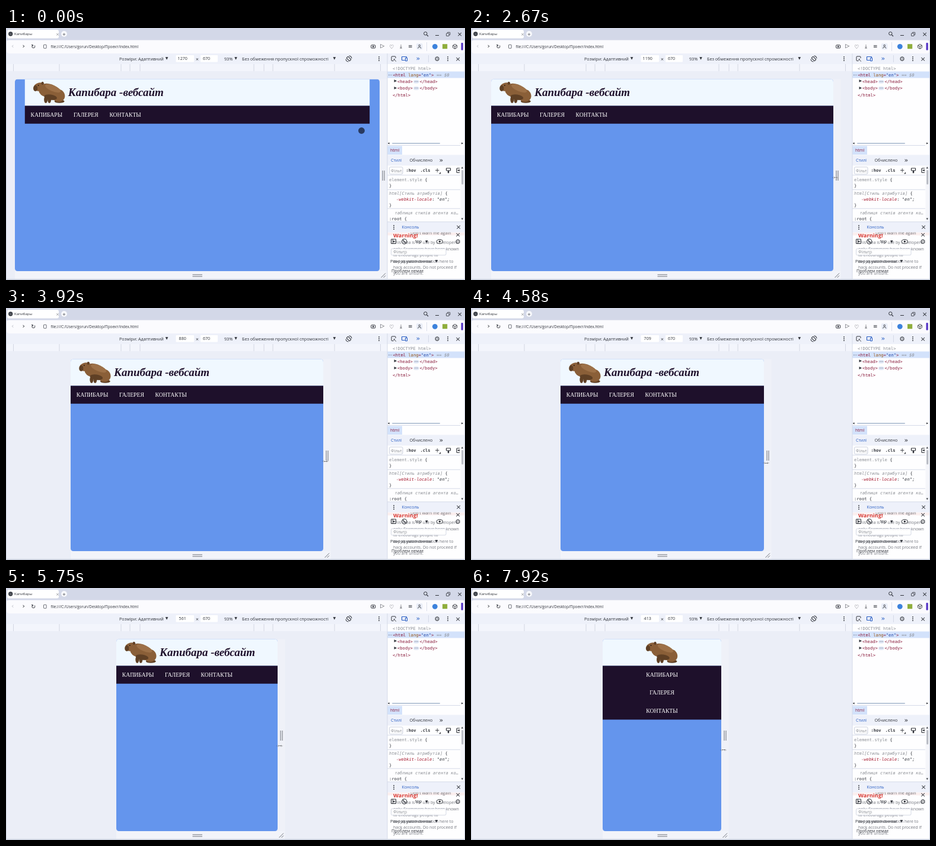
Write an HTML page with a canvas that moves like this. It is 774 by 426 pixels and loops after 8 s.

```html
<!DOCTYPE html>
<html lang="uk">
<head>
<meta charset="utf-8">
<title>Капибары</title>
<style>
html, body { margin: 0; width: 100%; height: 100%; overflow: hidden; background: #ebeef7; }
canvas { display: block; width: 774px; height: 426px; }
</style>
</head>
<body>
<canvas id="stage"></canvas>
<script>
const W = 774, H = 426, LOOP = 8000, FPS = 12;
const canvas = document.getElementById('stage');
const ratio = window.devicePixelRatio || 1;
canvas.width = W * ratio;
canvas.height = H * ratio;
const c = canvas.getContext('2d');

const UI = '"Open Sans", "Noto Sans", sans-serif';
const MONO = '"DejaVu Sans Mono", monospace';
const SERIF = '"Liberation Serif", "Noto Serif", serif';
const SIGN = '"DejaVu Sans", sans-serif';
const INK = '#30333a', GRAY = '#8b8e94', BLUE = '#2a5fc4', TAG = '#8a1c3c';
const BAR = '#eef1fa', RULE = '#d5dae8', MARK = '#d3e2fb';

// ---- drawing helpers ----
function rect(x, y, w, h, fill, r = 0) {
  c.fillStyle = fill;
  c.beginPath();
  c.roundRect(x, y, w, h, r);
  c.fill();
}
function frame(x, y, w, h, color = INK, r = 1, lw = 1) {
  c.strokeStyle = color;
  c.lineWidth = lw;
  c.beginPath();
  c.roundRect(x, y, w, h, r);
  c.stroke();
}
function oval(x, y, rx, ry, fill, turn = 0) {
  c.fillStyle = fill;
  c.beginPath();
  c.ellipse(x, y, rx, ry, turn, 0, 7);
  c.fill();
}
const dot = (x, y, r, fill) => oval(x, y, r, r, fill);
function ring(x, y, r, color = INK, lw = 1, from = 0, to = 6.3) {
  c.strokeStyle = color;
  c.lineWidth = lw;
  c.beginPath();
  c.arc(x, y, r, from, to);
  c.stroke();
}
function line(x1, y1, x2, y2, color = INK, lw = 1) {
  c.strokeStyle = color;
  c.lineWidth = lw;
  c.beginPath();
  c.moveTo(x1, y1);
  c.lineTo(x2, y2);
  c.stroke();
}
function clipTo(x, y, w, h, r, paint) {
  c.save();
  c.beginPath();
  c.roundRect(x, y, w, h, r);
  c.clip();
  paint();
  c.restore();
}
// y is the middle of the capitals
function text(s, x, y, size, color = INK, font = UI, style = '', align = 'left') {
  c.font = `${style} ${size}px ${font}`;
  c.fillStyle = color;
  c.textAlign = align;
  c.fillText(s, x, y + size * 0.35);
  return c.measureText(s).width;
}
// a symbol with its ink centred on x, y
function icon(s, x, y, size = 9, color = INK) {
  c.font = `${size}px ${SIGN}`;
  c.fillStyle = color;
  c.textAlign = 'left';
  const m = c.measureText(s);
  c.fillText(s, x + (m.actualBoundingBoxLeft - m.actualBoundingBoxRight) / 2,
    y + (m.actualBoundingBoxAscent - m.actualBoundingBoxDescent) / 2);
}
function code(x, y, ...parts) {
  for (const [s, color, style] of parts) x += text(s, x, y, 7.15, color, MONO, style);
}
const caret = (x, y) => icon('▼', x, y, 6);
const cross = (x, y) => icon('×', x, y, 11);
const kebab = (x, y) => [-3, 0, 3].forEach(d => dot(x, y + d, 0.9, INK));

// ---- motion ----
const SCALE = 0.4845, MID = 322.3, TOP = 86.5, BOTTOM = 411, GRAB = 24, END = 95;
const WIDTH = [[GRAB, 1268], [38, 1086], [55, 709], [69, 561], [83, 456], [93, 413]];

// monotone cubic through [tick, value] points
function track(keys, k) {
  const n = keys.length - 1;
  if (k <= keys[0][0]) return keys[0][1];
  if (k >= keys[n][0]) return keys[n][1];
  const rate = i => (keys[i + 1][1] - keys[i][1]) / (keys[i + 1][0] - keys[i][0]);
  const slope = i => {
    if (i === 0 || i === n) return 0;
    const a = rate(i - 1), b = rate(i);
    return a * b <= 0 ? 0 : 2 * a * b / (a + b);
  };
  let i = 0;
  while (k > keys[i + 1][0]) i++;
  const d = keys[i + 1][0] - keys[i][0], u = (k - keys[i][0]) / d;
  const e = u * u * (3 - 2 * u);
  return keys[i][1] * (1 - e) + keys[i + 1][1] * e
    + d * u * (1 - u) * (slope(i) * (1 - u) - slope(i + 1) * u);
}
function pointerAt(k, right) {
  if (k < GRAB) {
    const u = Math.min(1, k / 11), e = u * u * (3 - 2 * u);
    return [599.5 + 31.8 * e, 173.5 + 71.5 * e];
  }
  const reach = 4 - 2.2 * Math.max(0, 1 - (k - GRAB) / 8);
  return [right + reach, 245 + 28.5 * ((k - GRAB) / (END - GRAB)) ** 0.6];
}

// ---- browser window ----
function browser() {
  rect(0, 0, W, 21, '#d3d8e8');
  rect(2, 3, 87, 14.5, '#fff', 3);
  dot(7.7, 10, 3.7, '#3c4047');
  icon('~', 7.7, 10, 6, '#cfd3da');
  text('Капибары', 14, 10, 6.1);
  icon('×', 86.5, 10, 7, GRAY);
  dot(98, 10, 5, '#f7f8fc');
  icon('+', 98, 10, 7);
  ring(707.3, 9.3, 2.7);
  line(709.3, 11.3, 712, 14, INK, 1.2);
  line(724, 12.5, 730, 12.5);
  frame(744.3, 7.3, 4.5, 4.5, INK, 0.5, 0.8);
  rect(742, 8.7, 5.2, 5.2, '#d3d8e8');
  frame(742.5, 9, 4.5, 4.5, INK, 0.5, 0.8);
  cross(765, 10);

  rect(1, 20.5, W - 2, 22.5, '#fbfbfe', 4);
  icon('‹', 11, 31.3, 11, '#c0c4cd');
  icon('›', 30, 31.3, 11);
  icon('↻', 46, 31.3, 10);
  frame(63.5, 28.3, 4.6, 6, '#5c6068', 0.7, 0.9);
  text('file:///C:/Users/gorun/Desktop/Проект/index.html', 75.5, 31.5, 6.35);

  frame(615.7, 28.8, 7, 5.2);
  dot(619.2, 31.4, 1.3, INK);
  ['▷', '♡', '⤓', '≡'].forEach((s, i) => icon(s, 634.7 + 15.6 * i, 31.3, 9));
  rect(692, 26, 10.5, 10.5, '#e9edf7', 2);
  ring(697.2, 29.7, 1.4, INK, 0.8);
  ring(697.2, 34.6, 2.6, INK, 0.8, Math.PI, 2 * Math.PI);
  line(709.5, 24, 709.5, 39, '#dadfec');
  dot(723.3, 31.3, 4.4, '#3c82dc');
  rect(736, 27.2, 8.2, 8, '#8fae3c');
  for (let i = 0; i < 6; i++) {
    const at = n => [757 + 3.9 * Math.sin(n * Math.PI / 3), 31.3 + 3.9 * Math.cos(n * Math.PI / 3)];
    line(...at(i), ...at(i + 1), INK, 0.9);
    if (i % 2 === 0) line(757, 31.3, ...at(i), INK, 0.9);
  }
  rect(767.5, 25, 3.2, 12.5, '#5232c4', 1);
}

function deviceBar(width) {
  rect(1, 43, 642, 18, BAR);
  text('Розміри: Адаптивний', 191, 52, 7.2);
  text('93%', 368, 52, 7.2);
  text('Без обмеження пропускної спроможності', 398, 52, 7.2);
  for (const x of [271.3, 387.7, 554]) caret(x, 51.7);
  rect(286.5, 46, 30.5, 11.5, '#fff', 1);
  rect(328, 46, 29, 11.5, '#fff', 1);
  text(width, 297.7, 52, 7.1, INK, UI, '', 'center');
  text('670', 338, 52, 7.1, INK, UI, '', 'center');
  icon('×', 322, 52.3, 7);
  c.save();
  c.translate(578, 52);
  c.rotate(-Math.PI / 4);
  frame(-1.9, -3.6, 3.8, 7.2, INK, 0.8, 1.1);
  for (const a of [0, Math.PI]) ring(0, 0, 5, INK, 1, a - 0.7, a + 0.7);
  c.restore();
  kebab(629, 52);

  rect(1, 61, 642, 12, '#f3f5fc');
  for (const d of [96, 113, 128, 232, 309.5])
    for (const s of [-1, 1]) line(322 + s * d, 61, 322 + s * d, 73, '#d3d7e2');
}

// ---- side panel ----
function panel() {
  rect(643, 43, 131, 383, '#fefeff');
  rect(643, 43, 131, 18, BAR);
  frame(650, 48, 7, 7.5);
  rect(653.5, 51, 5.5, 6, BAR);
  icon('↖', 656, 54, 8);
  frame(667.5, 48.5, 8, 6, BLUE, 0.7, 1.2);
  rect(672.8, 50, 4.4, 6.6, BAR);
  frame(673.5, 50.5, 3, 5.3, BLUE, 0.7, 1.1);
  icon('»', 695, 52, 11, BLUE);
  line(712.5, 46, 712.5, 58, RULE);
  icon('⚙', 727, 52, 11);
  kebab(745, 52);
  cross(762, 52);

  rect(643, 73.5, 131, 11, MARK);
  icon('…', 647.7, 79, 7);
  code(652, 68, ['<!DOCTYPE html>', GRAY]);
  code(652.5, 79, ['<html ', TAG], ['lang', '#9a5a1c'], ['=', TAG], ['"en"', '#2347a8'], ['>', TAG]);
  code(726, 79, ['== $0', GRAY, 'italic']);
  ['head', 'body'].forEach((name, i) => {
    const y = 90.5 + 11.2 * i;
    icon('▶', 657, y - 0.7, 6);
    code(660, y, [`<${name}>`, TAG]);
    rect(687.3, y - 2.6, 8.8, 5.6, '#dce4f4', 2.5);
    icon('…', 691.7, y + 0.2, 6.5);
    code(697.5, y, [`</${name}>`, TAG]);
  });
  code(652, 113, ['</html>', TAG]);

  rect(651, 194.2, 81, 1.6, '#a3b4cc', 1);
  icon('◀', 645.5, 195, 4);
  icon('▶', 770, 195, 4);
  rect(643, 199.5, 25, 14.5, MARK);
  text('html', 648, 207, 7.1, TAG);

  rect(643, 214.5, 131, 18, BAR);
  text('Стилі', 649, 223.5, 7.1, BLUE);
  text('Обчислено', 680.5, 223.5, 7.1);
  icon('»', 734, 223.5, 11);
  frame(646.5, 235, 22.5, 12, '#c3c9d8', 2, 0.8);
  clipTo(647, 235, 20.5, 12, 0, () => text('Фільтр', 649, 241.2, 6.9, GRAY));
  text(':hov', 674.5, 240.7, 7, INK, MONO, 'bold');
  text('.cls', 698.5, 240.7, 7, INK, MONO, 'bold');
  icon('+', 727.5, 240.7, 10);
  icon('◢', 732, 244.5, 4);
  frame(742.5, 237, 7, 4, INK, 0.5, 1.2);
  rect(744.8, 241, 2.4, 4.3, INK);
  clipTo(759, 235, 6, 12, 0, () => frame(760, 237, 9, 7.5, INK, 1, 1.2));
  icon('◀', 763, 240.7, 5);

  code(646, 256, ['element.style ', GRAY], ['{', INK]);
  code(646, 266.3, ['}', INK]);
  code(646, 279.5, ['html[Стиль атрибутів] ', GRAY, 'italic'], ['{', INK]);
  code(658, 289.8, ['-webkit-locale', '#a81c30', 'italic'], [': ', INK], ['"en";', INK, 'italic']);
  code(646, 299.3, ['}', INK]);
  code(655.5, 312.5, ['таблиця стилів агента ко…', GRAY, 'italic']);
  code(646, 322, [':root ', INK], ['{', INK]);
  for (const y of [198.5, 248.8, 273.2, 305.2]) line(643, y, 766, y, RULE);
  rect(766.5, 233, 7, 94, '#f5f6fa');
  icon('▲', 769.8, 235.5, 4);
  rect(768.2, 240, 3, 24.5, '#b9bcc4', 1.5);
  icon('▼', 769.8, 323.3, 4);

  rect(643, 328, 131, 17.5, BAR);
  line(643, 327.7, W, 327.7, RULE);
  kebab(654, 337);
  text('Консоль', 667.5, 337, 7.1, BLUE);
  cross(763, 336.7);
  clipTo(643, 345.5, 131, 79, 0, drawer);
  line(643, 43, 643, 424, RULE);
}

function drawer() {
  rect(643, 345.5, 131, 5, '#fbefef');
  text("Don't warn me again", 682, 346.8, 7.1, '#6a6d74');
  text('Warning!', 653, 350.8, 9.3, '#d83a34', UI, 'bold');
  ['This area is for use by developers', 'only. Scammers have been known', 'to encourage people to',
    'copy/paste information here to', 'hack accounts. Do not proceed if', 'you are unsure.'
  ].forEach((s, i) => text(s, 653, 363 + i * 10.4, 7, '#74777e'));
  cross(762, 349.7);
  frame(649.5, 357, 8, 7.5, INK, 0.7, 1.1);
  line(652.2, 357, 652.2, 364.5);
  icon('▶', 655, 360.8, 4);
  ring(671.7, 361, 4.2, INK, 1.1);
  line(668.8, 358, 674.6, 364, INK, 1.1);
  text('top', 690, 361, 7.1);
  caret(709.5, 361);
  oval(731.3, 361, 5.6, 3.9, INK);
  oval(731.3, 361, 4.6, 2.9, '#fff');
  dot(731.3, 361, 1.7, INK);
  icon('⚙', 762, 361, 11);
  rect(649.5, 373, 92.5, 11, 'rgba(255,255,255,0.88)', 2);
  frame(649.5, 373, 92.5, 11, '#c3c9d8', 2, 0.7);
  text('Фільтр', 653, 378.7, 7.1, GRAY);
  text('Рівні за умовчанням', 648, 394.7, 7);
  caret(726, 394);
  text('Проблем немає', 650, 410.5, 7.1);
}

// ---- page under test ----
function capybara(x, y) {
  const coat = '#8a5f38', shade = '#5f4025';
  c.save();
  c.translate(x, y);
  oval(44, 33, 8.5, 2.8, shade);
  for (const d of [0, 6]) oval(21 + d, 30, 3, 6, shade);
  oval(30, 17, 21, 12, coat, 0.45);
  oval(42, 23, 11.5, 10.5, coat, 0.6);
  oval(18, 14, 9, 11, coat, -0.5);
  oval(29, 26, 11, 4.5, shade, 0.15);
  oval(33, 11, 14, 5, '#9d7148', 0.4);
  oval(10, 8.5, 9.5, 7, coat, -0.25);
  oval(3.5, 11, 3.6, 5, shade);
  oval(15.5, 2.3, 2.2, 2.6, shade);
  dot(8.5, 6, 0.9, '#22160d');
  c.restore();
}

function page(width) {
  const left = Math.round(MID - width * SCALE / 2);
  const right = Math.round(MID + width * SCALE / 2);
  const w = right - left, tall = BOTTOM - TOP;
  rect(right, TOP, 12.5, tall, '#eff1f8');
  rect(left, BOTTOM, w + 12.5, 13, '#f2f4fa');

  const boxW = Math.min(w, 1200 * SCALE), x = left + (w - boxW) / 2;
  const mobile = width <= 425, wrap = !mobile && width < 486;
  const navY = wrap ? 158 : 131.5, row = 30.3, size = 20 * SCALE;
  clipTo(left, TOP, w, tall, 4.5, () => {
    rect(left, TOP, w, tall, '#6495ed');
    rect(x, TOP, boxW, navY - TOP, '#f0f8ff');
    rect(x, navY, boxW, row * (mobile ? 3 : 1), '#1e102b');
    capybara(mobile ? x + boxW / 2 - 27 : x + 14.3, 91);
    if (!mobile)
      text('Капибара -вебсайт', x + (wrap ? 0.5 : 73), navY - 22.9, 19, '#1e102b', SERIF, 'italic bold');
    let pen = x + size;
    ['КАПИБАРЫ', 'ГАЛЕРЕЯ', 'КОНТАКТЫ'].forEach((s, i) => {
      const y = navY + row * (mobile ? i + 0.5 : 0.5);
      if (mobile) text(s, x + boxW / 2, y, size, '#fff', SERIF, '', 'center');
      else pen += text(s, pen, y, size, '#fff', SERIF) + 2 * size - 0.6;
    });
  });

  const grip = '#6d7179';
  for (const d of [5, 8]) line(right + d, 241, right + d, 258, grip);
  for (const y of [417, 420]) line(314.5, y, 331, y, grip);
  for (const d of [0, 4]) line(right + 2.5 + d, 422, right + 10, 414.5 + d, grip);
  return right;
}

function pointer(x, y, inside) {
  if (inside) {
    dot(x, y, 5.4, 'rgba(22,28,48,0.75)');
    return;
  }
  line(x - 4, y, x + 4, y, '#fff', 2);
  line(x - 3, y, x + 3, y, '#50545c', 0.8);
  icon('◁', x - 3.8, y, 4, INK);
  icon('▷', x + 3.8, y, 4, INK);
}

function draw(k) {
  c.setTransform(ratio, 0, 0, ratio, 0, 0);
  rect(0, 0, W, H, '#ebeef7');
  const width = k < 9 ? 1270 : Math.round(track(WIDTH, k));
  browser();
  deviceBar(width);
  const right = page(width);
  panel();
  rect(0, 424.3, W, 1.7, '#cdd3e1');
  for (const x of [0, W - 1]) rect(x, 21, 1, H - 21, '#cdd3e1');
  const [x, y] = pointerAt(k, right);
  pointer(x, y, x < right);
}

let start = null, last = -1;
function tick(now) {
  if (start === null) start = now;
  const k = Math.floor(((now - start) % LOOP + 4) * FPS / 1000) % (LOOP * FPS / 1000);
  if (k !== last) draw(last = k);
  requestAnimationFrame(tick);
}
draw(0);
requestAnimationFrame(tick);
</script>
</body>
</html>
```
